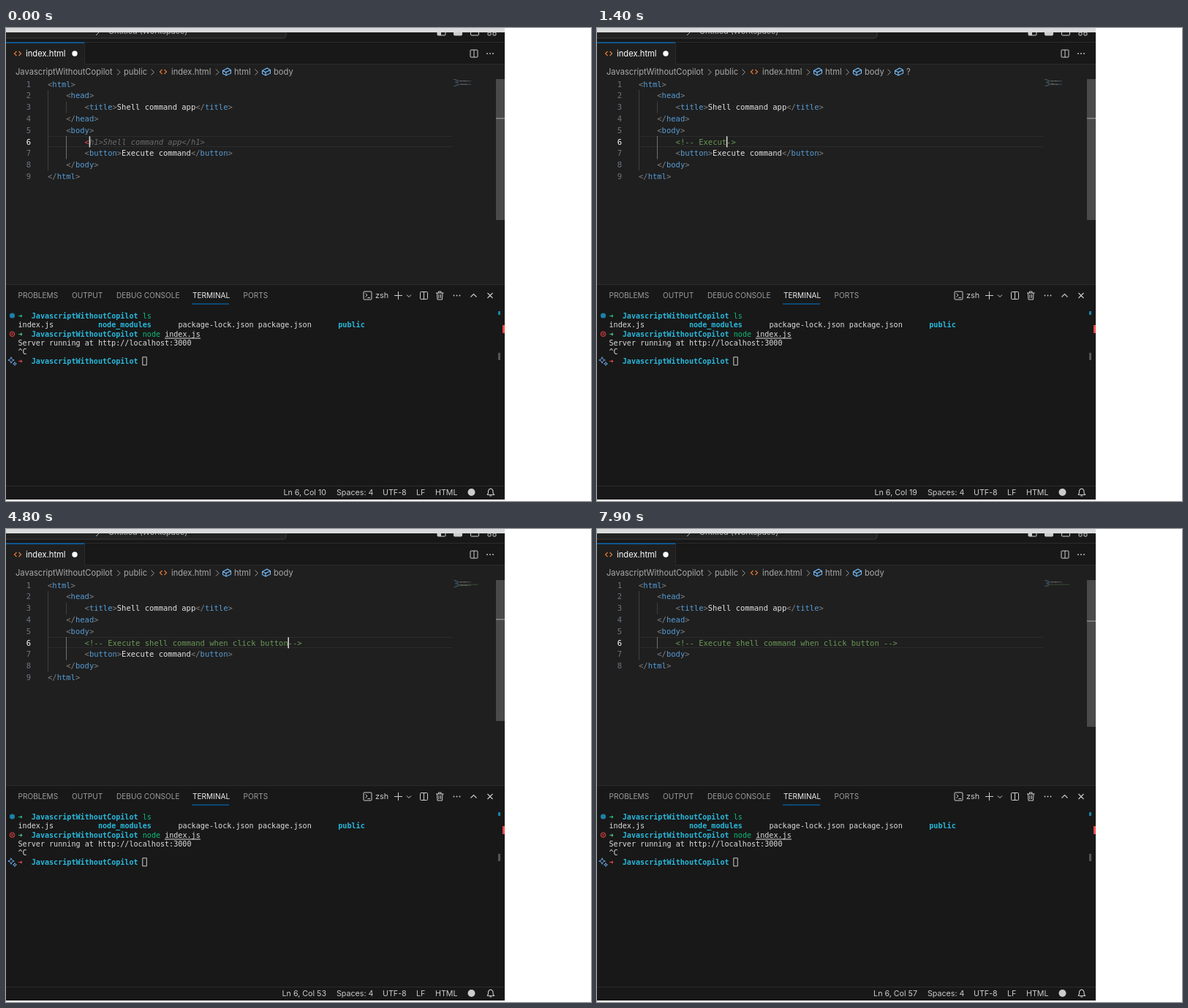
Animation of 800x648 px, one loop 8000 ms. Source, as an HTML page with a canvas:

```html
<!DOCTYPE html>
<html lang="en">
<head>
<meta charset="utf-8">
<title>Editor session</title>
<style>
html, body { margin: 0; width: 800px; height: 648px; overflow: hidden; background: #fff; }
canvas { display: block; width: 800px; height: 648px; }
</style>
</head>
<body>
<canvas id="stage"></canvas>
<script>
const LOOP = 8000;
const UI = 'Inter, "Open Sans", sans-serif';
const MONO = '"DejaVu Sans Mono", "Liberation Mono", monospace';
const CODE = '10.5px ' + MONO;
const TERM = '10.1px ' + MONO;
const X0 = 57, CW = 6.32, Y0 = 77, LH = 15.78;
const TW = 6.08;
const COMMENT = '<!-- Execute shell command when click button ';
const GREY = '#808080', BLUE = '#569cd6', PLAIN = '#e2e2e2', GREEN = '#6a9955', RED = '#f44747';

// time, characters typed
const KEYS = [[0, 1], [200, 2], [400, 3], [500, 4], [600, 4], [700, 5], [1300, 10], [1400, 11],
  [2400, 22], [2900, 27], [3000, 27], [3400, 32], [3800, 32], [3900, 33], [4700, 44], [5000, 44], [5100, 45]];
// time, pointer x, pointer y
const POINTER = [[5300, 352, 214], [5500, 313, 172], [5700, 311, 172], [6200, 124, 172], [6400, 106, 172]];

const canvas = document.getElementById('stage');
const c = canvas.getContext('2d');
const dpr = window.devicePixelRatio || 1;
canvas.width = 800 * dpr;
canvas.height = 648 * dpr;

function lerpKeys(keys, t, k) {
  if (t <= keys[0][0]) return keys[0][k];
  for (let i = 1; i < keys.length; i++) {
    const a = keys[i - 1], b = keys[i];
    if (t <= b[0]) return a[k] + (b[k] - a[k]) * (t - a[0]) / (b[0] - a[0]);
  }
  return keys[keys.length - 1][k];
}
const typedAt = t => Math.floor(lerpKeys(KEYS, t, 1) + 1e-6);
const colX = col => X0 + (col - 1) * CW;
const rowY = row => Y0 + (row - 1) * LH;

function rect(x, y, w, h, color) {
  c.fillStyle = color;
  c.fillRect(x, y, w, h);
}
function text(s, x, y, font, color, align = 'left') {
  c.font = font;
  c.fillStyle = color;
  c.textAlign = align;
  c.fillText(s, x, y);
}
const ui = (s, x, y, size, color, align) => text(s, x, y, size + 'px ' + UI, color, align);

function lines(color, width, ...paths) {
  c.strokeStyle = color;
  c.lineWidth = width;
  c.beginPath();
  for (const p of paths) {
    for (let i = 0; i < p.length; i += 2) {
      if (i) c.lineTo(p[i], p[i + 1]); else c.moveTo(p[i], p[i + 1]);
    }
  }
  c.stroke();
}
function box(x, y, w, h, color, r = 1, width = 1) {
  c.strokeStyle = color;
  c.lineWidth = width;
  c.beginPath();
  c.roundRect(x, y, w, h, r);
  c.stroke();
}
function dot(x, y, r, color) {
  c.fillStyle = color;
  c.beginPath();
  c.arc(x, y, r, 0, Math.PI * 2);
  c.fill();
}
function chevron(x, y) {
  lines('#9d9d9d', 1, [x - 2, y - 4, x + 2, y, x - 2, y + 4]);
}
function angleIcon(x, y) {
  lines('#e37933', 1.2, [x - 1.5, y - 3, x - 4.5, y, x - 1.5, y + 3], [x + 1.5, y - 3, x + 4.5, y, x + 1.5, y + 3]);
}
function cube(x, y) {
  lines('#75beff', 1.1,
    [x - 5.5, y - 1.5, x + 1, y - 5, x + 5.5, y - 2.5, x + 5.5, y + 2, x - 1, y + 5, x - 5.5, y + 2.5, x - 5.5, y - 1.5, x - 1, y + .6, x + 5.5, y - 2.5],
    [x - 1, y + .6, x - 1, y + 5]);
}
function more(x, y) {
  for (const d of [-4, 0, 4]) dot(x + d, y, .9, '#ccc');
}
function splitIcon(x, y) {
  box(x - 5, y - 5, 10, 10, '#ccc');
  lines('#ccc', 1, [x, y - 5, x, y + 5]);
}
function star(x, y, r) {
  lines('#6ca5e8', 1, [x, y - r, x + r * .3, y - r * .3, x + r, y, x + r * .3, y + r * .3, x, y + r,
    x - r * .3, y + r * .3, x - r, y, x - r * .3, y - r * .3, x, y - r]);
}

// Splits markup into coloured pieces.
function pieces(s) {
  return s.split(/(<\/?|>)/).filter(Boolean).map((p, i, all) =>
    [p, /[<>]/.test(p) ? GREY : /^</.test(all[i - 1] || '') ? BLUE : PLAIN]);
}
function drawCode(parts, row, col) {
  for (const [s, color] of parts) {
    text(s, colX(col), rowY(row) + 3.7, CODE, color);
    col += s.length;
  }
}

function stateAt(t) {
  const typed = typedAt(t), shown = typedAt(Math.max(0, t - 100));
  const s = { typed, shown, row: 6, col: 9 + typed, stat: 9 + shown, crumb: '', sel: 0, caret: true,
    button: t < 6600, rows: t < 7200 ? 9 : 8, pointer: t >= 5300 && t < 6600 };
  if (t >= 200 && t < 3200) s.crumb = '?';
  if (t >= 5600) {
    s.row = 7;
    s.col = s.stat = 41;
    if (t >= 5800) s.crumb = 'button';
    if (t >= 5700) {
      const x = lerpKeys(POINTER, t, 1);
      s.col = Math.max(9, Math.min(41, Math.round((x - X0) / CW) + 1));
      s.stat = s.col;
      s.sel = 41 - s.col;
    }
  }
  if (t >= 6600) {
    s.sel = 0;
    s.col = s.stat = t < 6800 ? 9 : t < 7000 ? 5 : 1;
  }
  if (t >= 7200) {
    s.row = 6;
    s.col = s.stat = 57;
    s.caret = t < 7700;
  }
  if (t >= 7500) s.crumb = '';
  return s;
}

function drawFrame() {
  rect(0, 0, 800, 648, '#fff');
  rect(0, 0, 682, 646, '#181818');

  // title bar, cut by the upper edge
  c.save();
  c.beginPath();
  c.rect(0, 6, 682, 14);
  c.clip();
  c.beginPath();
  c.roundRect(-10, -8, 393, 22, 4);
  c.fillStyle = '#222';
  c.fill();
  box(-10, -8, 393, 22, '#3a3a3a', 4);
  ui('Untitled (Workspace)', 140, 8, 10.8, '#b5b5b5');
  lines('#b5b5b5', 1, [123, 10, 128, 5]);
  for (const x of [590, 612.5, 635.5]) box(x, 0, 11, 10, '#ccc');
  rect(590, 1, 5, 9, '#ccc');
  rect(613, 5, 10, 5, '#ccc');
  box(659, 6, 4, 4, '#ccc');
  box(666, 6, 4, 4, '#ccc');
  c.restore();
  rect(0, 0, 682, 6, '#d9dadb');
  rect(0, 19, 682, 1, '#2b2b2b');

  // tab strip
  rect(0, 49, 682, 1, '#2b2b2b');
  rect(0, 20, 107, 30, '#1f1f1f');
  rect(0, 19.5, 107, 1.2, '#0078d4');
  rect(107, 20, 1, 30, '#2b2b2b');
  angleIcon(16, 35);
  ui('index.html', 27, 39, 11.2, '#fff');
  dot(94, 35, 3.7, '#fff');
  splitIcon(640, 35);
  more(662, 35);
  rect(0, 50, 682, 301, '#1f1f1f');
}

function drawCrumbs(extra) {
  const put = (s, x) => ui(s, x, 64, 11.15, '#a9a9a9');
  put('JavascriptWithoutCopilot', 13);
  put('public', 161);
  put('index.html', 226);
  put('html', 312);
  put('body', 366);
  for (const x of [154, 200.5, 289, 342.5]) chevron(x, 60.5);
  angleIcon(215, 60);
  cube(302, 60);
  cube(356, 60);
  if (extra) {
    chevron(399.5, 60.5);
    cube(413, 60);
    put(extra, 423);
  }
}

function drawMinimap(rows) {
  rows.forEach((row, i) => {
    let x = 612;
    for (const [s, color] of row.parts) {
      c.globalAlpha = .55;
      s.split('').forEach((ch, k) => {
        if (ch !== ' ') rect(x + (row.col - 1 + k) * .6, 70 + i * 1.12, .6, .9, color);
      });
      x += s.length * .6;
    }
  });
  c.globalAlpha = 1;
}

function drawEditor(t, s) {
  const line = (col, str) => ({ col, parts: pieces(str) });
  const rows = [line(1, '<html>'), line(5, '<head>'), line(9, '<title>Shell command app</title>'),
    line(5, '</head>'), line(5, '<body>')];
  const closed = s.typed >= 4;
  rows.push({ col: 9, parts: [[COMMENT.slice(0, s.typed), closed ? GREEN : RED]] });
  if (closed) {
    // the closing mark trails the newest character
    const tail = ' '.repeat(Math.max(0, s.shown - s.typed)) + '-->';
    rows[5].parts.push([tail.slice(s.typed - s.shown), GREEN]);
  }
  if (s.rows === 9) rows.push(s.button ? line(9, '<button>Execute command</button>') : { col: 9, parts: [] });
  rows.push(line(5, '</body>'), line(1, '</html>'));

  if (!s.sel) {
    const y = Math.round(rowY(s.row) - 7.5);
    rect(57, y, 554, 1, '#2c2c2c');
    rect(57, y + 14, 554, 1, '#2c2c2c');
  } else {
    c.fillStyle = '#264f78';
    c.beginPath();
    c.roundRect(colX(s.col), rowY(7) - 7.9, s.sel * CW, 15.8, 3);
    c.fill();
    if (s.col < 25) dot(colX(24) + CW / 2, rowY(7), .7, '#6f8aa5');
  }

  const guide = (x, from, to, color) => rect(x, rowY(from) - LH / 2, 1, (to - from + 1) * LH, color);
  guide(57, 2, s.rows - 1, '#404040');
  guide(82, 3, 3, '#404040');
  guide(82, 6, s.rows - 2, '#707070');

  rows.forEach((row, i) => {
    text(i + 1, 34, rowY(i + 1) + 3.7, CODE, i + 1 === s.row ? '#fff' : '#6e7681', 'right');
    drawCode(row.parts, i + 1, row.col);
  });
  if (t < 100) text('h1>Shell command app</h1>', colX(10), rowY(6) + 3.7, 'italic ' + CODE, '#6b6b6b');
  if (s.caret) rect(colX(s.col) - .2, rowY(s.row) - 7.5, 1.5, 15, '#e0e0e0');

  drawMinimap(rows);
  rect(670, 70, 12, s.rows === 9 ? 193 : 201, '#4a4a4a');
  const mark = s.row === 7 ? 134 : s.rows === 9 ? 123.5 : 126;
  rect(670, mark - .5, 12, 1.5, '#8a8a8a');
}

function drawPanel() {
  rect(0, 351, 682, 1, '#2b2b2b');
  const tabs = [['PROBLEMS', 16.5], ['OUTPUT', 90], ['DEBUG CONSOLE', 151], ['TERMINAL', 255], ['PORTS', 324.5]];
  for (const [s, x] of tabs) ui(s, x, 370, 10.1, s === 'TERMINAL' ? '#eee' : '#9d9d9d');
  rect(254, 377.5, 51, 1, '#0078d4');

  const k = '#ccc';
  box(489, 361, 11, 11, k);
  lines(k, 1, [491.5, 363.5, 494, 366, 491.5, 368.5], [494.5, 369.5, 498, 369.5]);
  ui('zsh', 505, 370, 10.8, k);
  lines(k, 1, [531, 366.5, 542, 366.5], [536.5, 361, 536.5, 372], [548, 365.5, 551, 368.5, 554, 365.5]);
  splitIcon(571.5, 366.5);
  lines(k, 1, [588, 363, 598.5, 363], [591.5, 363, 591.5, 361, 595, 361, 595, 363],
    [589.5, 363, 590, 372, 596.5, 372, 597, 363], [592, 365, 592, 370], [594.5, 365, 594.5, 370]);
  more(616.5, 366.5);
  lines(k, 1.1, [635.5, 368.5, 639.5, 364.5, 643.5, 368.5], [658.5, 363, 665.5, 370], [665.5, 363, 658.5, 370]);

  const put = (s, col, row, color = '#ddd', bold = false) =>
    text(s, 16.5 + col * TW, 397.6 + row * 12.47, (bold ? 'bold ' : '') + TERM, color);
  const cyan = '#29b8db', lime = '#0dbc79';
  for (const row of [0, 2, 5]) {
    put('➜', 0, row, row ? '#f14c4c' : '#23d18b', true);
    put('JavascriptWithoutCopilot', 3, row, cyan, true);
  }
  put('➜', 0, 2, '#23d18b', true);
  put('ls', 28, 0, lime);
  put('index.js', 0, 1);
  put('node_modules', 18, 1, cyan, true);
  put('package-lock.json', 36, 1);
  put('package.json', 54, 1);
  put('public', 72, 1, cyan, true);
  put('node', 28, 2, lime);
  put('index.js', 33, 2);
  rect(217, 424.5, 49, 1, '#ddd');
  put('Server running at http://localhost:3000', 0, 3);
  put('^C', 0, 4);
  box(186.8, 450.8, 5.5, 11, '#ccc', 0);

  dot(8.5, 394, 3.6, '#1b81a8');
  c.strokeStyle = RED;
  c.lineWidth = 1;
  c.beginPath();
  c.arc(8.5, 419.3, 3.3, 0, Math.PI * 2);
  c.stroke();
  lines(RED, 1, [7, 417.8, 10, 420.8], [10, 417.8, 7, 420.8]);
  star(7, 455, 4.2);
  star(12, 460, 2.4);
  rect(673, 388, 3, 5, '#1b81a8');
  rect(673, 445, 3, 10, '#555');
  rect(679, 407, 3, 11, '#f14c4c');
}

function drawStatus(s) {
  rect(0, 627, 682, 1, '#2b2b2b');
  const put = (str, x, align) => ui(str, x, 640, 10.7, '#ccc', align);
  put(`Ln ${s.row}, Col ${s.stat}` + (s.sel ? ` (${s.sel} selected)` : ''), 438, 'right');
  put('Spaces: 4', 452);
  put('UTF-8', 515);
  put('LF', 561);
  put('HTML', 587);
  dot(636.5, 636, 5, '#ccc');
  lines('#ccc', 1.1, [658, 639.5, 667.5, 639.5, 666, 637, 666, 634, 664.5, 631.8, 662.8, 631,
    661, 631.8, 659.5, 634, 659.5, 637, 658, 639.5], [661.3, 641, 664.2, 641]);
}

function drawPointer(t) {
  const x = lerpKeys(POINTER, t, 1), y = lerpKeys(POINTER, t, 2);
  const beam = [[x - 2.5, y - 6, x, y - 5, x + 2.5, y - 6], [x, y - 5, x, y + 5],
    [x - 2.5, y + 6, x, y + 5, x + 2.5, y + 6]];
  lines('#333', 2.6, ...beam);
  lines('#eee', 1.3, ...beam);
}

function draw(t) {
  const s = stateAt(t);
  c.setTransform(dpr, 0, 0, dpr, 0, 0);
  drawFrame();
  drawCrumbs(s.crumb);
  drawEditor(t, s);
  drawPanel();
  drawStatus(s);
  if (s.pointer) drawPointer(t);
}

const start = performance.now();
function tick() {
  draw((performance.now() - start) % LOOP);
  requestAnimationFrame(tick);
}
draw(0);
requestAnimationFrame(tick);
</script>
</body>
</html>
```
